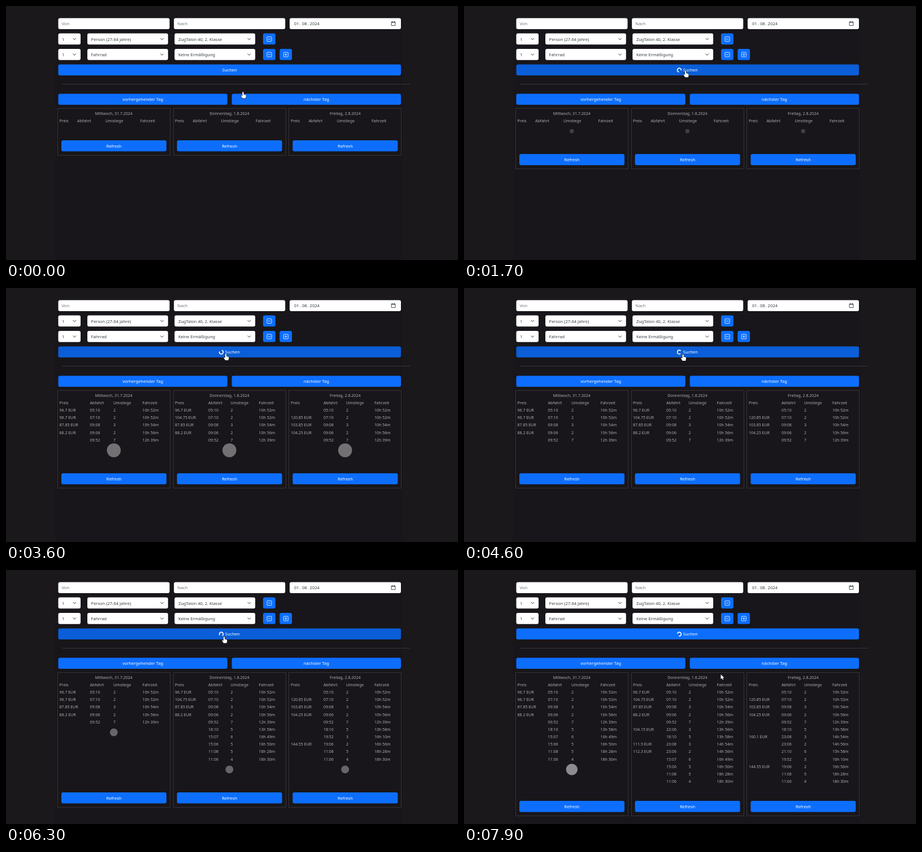
An HTML page with a canvas that plays this animation: 800x450 px, repeating every 8 s.

```html
<!DOCTYPE html>
<html lang="de">
<head>
<meta charset="utf-8">
<style>
  html, body { margin: 0; width: 100%; height: 100%; overflow: hidden; background: #1a181b; }
  canvas { display: block; }
</style>
</head>
<body>
<canvas width="800" height="450"></canvas>
<script>
const ctx = document.querySelector('canvas').getContext('2d');
const LOOP = 8000, SEARCH = 840, SPIN = 750;
const ROW = 13.17, BUSY_HEIGHT = 24.4;
const BLUE = [13, 110, 253], HOVER_BLUE = [11, 94, 215];
const GREY = '#adabad', DARK = '#343a40';

// departure, changes, duration
const trips = {
  a: ['05:10', 2, '10h 52m'], b: ['07:10', 2, '10h 52m'], c: ['09:08', 3, '10h 54m'],
  d: ['09:06', 2, '10h 56m'], e: ['09:52', 7, '12h 39m'], f: ['18:10', 5, '13h 58m'],
  g: ['15:07', 6, '16h 49m'], h: ['15:06', 5, '16h 50m'], i: ['11:08', 5, '18h 28m'],
  j: ['11:06', 4, '18h 30m'], k: ['22:06', 3, '13h 56m'], l: ['23:08', 3, '14h 54m'],
  m: ['23:06', 2, '14h 56m'], n: ['19:52', 3, '16h 10m'], o: ['19:06', 2, '16h 56m'],
  p: ['21:10', 6, '15h 58m'],
};
// stages: [start time, trips shown]; columns: offsets once filled
const days = [
  { title: 'Mittwoch, 31.7.2024', x: 91, columns: [0, 54, 95.5, 147], done: Infinity,
    prices: { a: 96.7, b: 96.7, c: 87.85, d: 88.2 },
    stages: [[0, ''], [3500, 'abcde'], [6500, 'abcdefghij']] },
  { title: 'Donnerstag, 1.8.2024', x: 295.6, columns: [0, 59, 98.5, 148.5], done: 7300,
    prices: { a: 96.7, b: 104.75, c: 87.85, d: 88.2, k: 104.15, l: 111.9, m: 112.3 },
    stages: [[0, ''], [1900, 'abcde'], [4700, 'abcdefghij'], [7300, 'abcdekflmghij']] },
  { title: 'Freitag, 2.8.2024', x: 500.4, columns: [0, 58, 98, 148], done: 7600,
    prices: { b: 120.85, c: 103.85, d: 104.25, l: 160.1, o: 144.55 },
    stages: [[0, ''], [2200, 'abcde'], [5600, 'abcdefnoij'], [7600, 'abcdeflmpnoij']] },
];
const emptyColumns = [0, 31.5, 81.5, 143];

// time, x, y of the pointer tip
const pointerPath = [
  [0, 419.5, 152], [400, 394, 113.5], [600, 394, 113.5], [900, 394, 113.5], [2300, 391, 115.5],
  [3600, 389, 116.5], [5500, 386.5, 118], [6300, 386, 118], [6700, 455.5, 180], [8000, 454.5, 185],
];
const hand = new Path2D('M-1.1 1Q0-.8 1.1 1V4.4L4.4 5.3Q5.7 5.9 5.4 8L4.6 11.6H-.8L-3.6 7.6Q-3.8 6-2.2 6.5L-1.1 7.5Z');
const arrow = new Path2D('M0 0V8.4L2 6.6 3.4 9.6 4.8 9 3.4 6.1H6Z');

const clamp = v => Math.max(0, Math.min(1, v));

function text(str, x, y, { size = 7.5, color = '#fff', align = 'left' } = {}) {
  ctx.font = `${size}px "Noto Sans", "Open Sans", sans-serif`;
  ctx.fillStyle = color;
  ctx.textAlign = align;
  ctx.fillText(str, x, y + 2.7);
}

const cell = (str, x, y, align) => text(str, x, y, { size: 7, color: GREY, align });

function box(x, y, w, h, fill) {
  ctx.fillStyle = fill;
  ctx.beginPath();
  ctx.roundRect(x, y, w, h, 3);
  ctx.fill();
}

function line(path, x, y, color, width = 1) {
  ctx.save();
  ctx.translate(x, y);
  ctx.strokeStyle = color;
  ctx.lineWidth = width;
  ctx.stroke(new Path2D(path));
  ctx.restore();
}

function button(x, y, w, label, hover = 0) {
  const rgb = BLUE.map((c, i) => c + (HOVER_BLUE[i] - c) * hover);
  box(x, y, w, 19.6, `rgb(${rgb})`);
  if (label) text(label, x + w / 2, y + 10, { align: 'center' });
}

function iconButton(x, y, plus) {
  button(x, y, 21.8);
  line('M-3.2-4H3.2Q4-4 4-3.2V3.2Q4 4 3.2 4H-3.2Q-4 4-4 3.2V-3.2Q-4-4-3.2-4ZM-2.2 0H2.2' +
    (plus ? 'M0-2.2V2.2' : ''), x + 11, y + 10, '#fff', .8);
}

function input(x, label) {
  box(x, 21.5, 197, 19.6, '#fff');
  text(label, x + 6, 31.5, { color: '#6c757d' });
}

function select(x, y, w, label) {
  box(x, y, w, 19.6, '#fff');
  text(label, x + 6.6, y + 10.2, { color: '#3a3f44' });
  line('M-2.7-1.4L0 1.4 2.7-1.4', x + w - 10.7, y + 9.8, DARK);
}

function form(t) {
  input(92.5, 'Von');
  input(297.2, 'Nach');
  input(502, '');
  [['01', 510], ['.', 519.7], ['08', 524], ['.', 533.5], ['2024', 537.6]]
    .forEach(([part, x]) => text(part, x, 31.5, { color: DARK }));
  line('M-3.4-2.8H3.4V3.6H-3.4ZM-3.4-1.9H3.4M-2-4V-2M2-4V-2', 685.5, 31, DARK, .9);

  [['Person (27-64 Jahre)', 'ZugTalon 40, 2. Klasse'], ['Fahrrad', 'Keine Ermäßigung']]
    .forEach(([who, card], i) => {
      const y = 48.6 + i * 27.5;
      select(92.5, y, 39.5, '1');
      select(144, y, 142.8, who);
      select(298.3, y, 142.8, card);
      iconButton(455, y);
      if (i) iconButton(484.3, y, true);
    });

  const hover = clamp((t - 200) / 150) * (1 - clamp((t - 6400) / 150));
  const busy = t >= SEARCH;
  button(92.5, 103.4, 606.5, busy ? '' : 'Suchen', hover);
  if (busy) {
    text('Suchen', 400.8, 113.4, { align: 'center' });
    const angle = (t - SEARCH) / SPIN * 2 * Math.PI;
    ctx.strokeStyle = '#fff';
    ctx.lineWidth = 1.7;
    ctx.beginPath();
    ctx.arc(381, 113.6, 3.4, angle + Math.PI / 4, angle + Math.PI * 7 / 4);
    ctx.stroke();
  }
  line('M100 0H715', 0, 138.5, '#39373a');
  button(92.5, 155.4, 299.3, 'vorhergehender Tag');
  button(399.7, 155.4, 299.3, 'nächster Tag');
}

function grower(x, y, t) {
  const phase = (t - SEARCH) / SPIN % 1;
  ctx.globalAlpha = phase < .5 ? phase * 2 : 2 - phase * 2;
  ctx.fillStyle = '#a6a4a6';
  ctx.beginPath();
  ctx.arc(x, y, 12.3 * Math.min(1, phase * 2), 0, 2 * Math.PI);
  ctx.fill();
  ctx.globalAlpha = 1;
}

function results(t) {
  const states = days.map(day => ({
    ...day,
    shown: day.stages.filter(([start]) => t >= start).pop()[1],
    busy: t >= SEARCH && t < day.done,
  }));
  const height = 83 + Math.max(...states.map(s => s.shown.length * ROW + (s.busy ? BUSY_HEIGHT : 0)));

  for (const { title, x, columns, prices, shown, busy } of states) {
    const left = x + 3.5, center = x + 99.8;
    const offsets = shown ? columns : emptyColumns;
    ctx.strokeStyle = '#363437';
    ctx.lineWidth = 1;
    ctx.strokeRect(Math.round(x) + .5, 181.5, 199, Math.round(height));
    cell(title, center, 190.5, 'center');
    ['Preis', 'Abfahrt', 'Umstiege', 'Fahrzeit'].forEach((head, i) => cell(head, left + offsets[i], 203.3));
    [...shown].forEach((key, row) => {
      const price = prices[key] ? prices[key] + ' EUR' : '';
      [price, ...trips[key]].forEach((value, i) => cell(value, left + offsets[i], 216.4 + row * ROW));
    });
    if (busy) grower(center, 221.7 + shown.length * ROW, t);
    button(x + 7, 181.5 + height - 26.6, 186, 'Refresh');
  }
}

function pointer(t) {
  const next = pointerPath.findIndex(([time]) => time > t);
  const [t0, x0, y0] = pointerPath[next - 1], [t1, x1, y1] = pointerPath[next];
  const k = (t - t0) / (t1 - t0), ease = k * k * (3 - 2 * k);
  const shape = t < 6450 ? hand : arrow;
  ctx.save();
  ctx.translate(x0 + (x1 - x0) * ease, y0 + (y1 - y0) * ease);
  ctx.strokeStyle = '#111';
  ctx.lineWidth = 1.2;
  ctx.stroke(shape);
  ctx.fillStyle = '#fff';
  ctx.fill(shape);
  ctx.restore();
}

function draw() {
  const t = performance.now() % LOOP;
  ctx.fillStyle = '#1a181b';
  ctx.fillRect(0, 0, 800, 450);
  ctx.fillStyle = '#18161a';
  ctx.fillRect(87, 20, 615, 430);
  form(t);
  results(t);
  pointer(t);
  requestAnimationFrame(draw);
}
draw();
</script>
</body>
</html>
```
